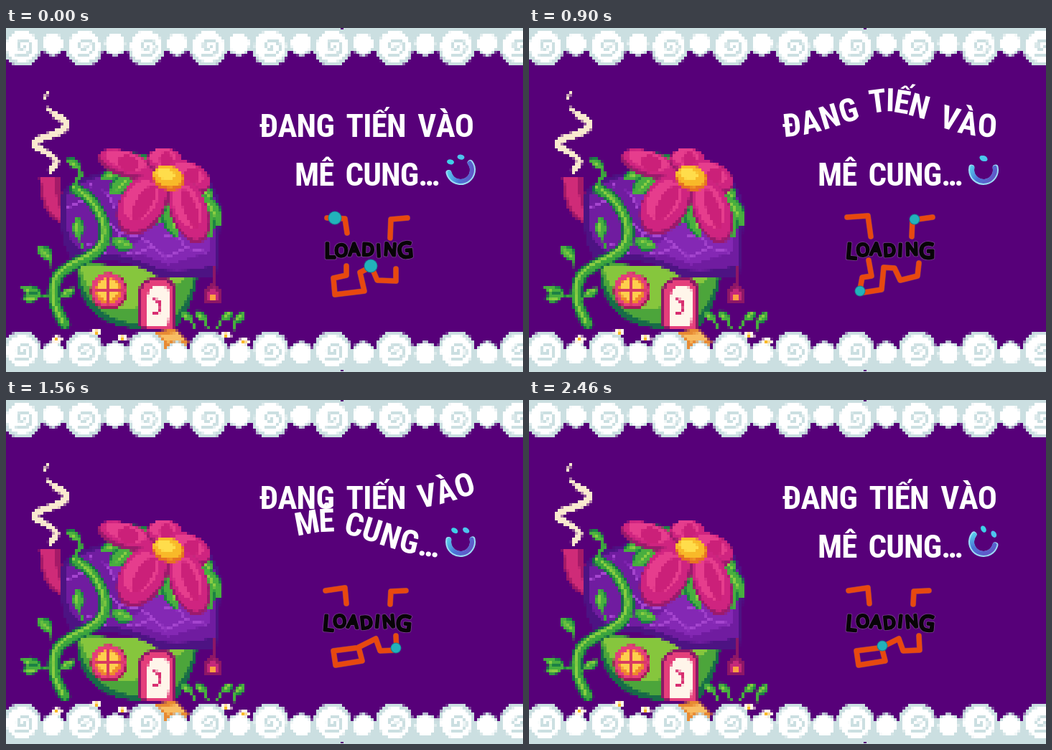
An HTML page with a canvas for the animation above (2520 ms loop, 720 by 480 pixels).

```html
<!DOCTYPE html>
<html lang="vi">
<head>
<meta charset="utf-8">
<title>Loading</title>
<style>
html, body { margin: 0; width: 100%; height: 100%; overflow: hidden; background: #570079 }
canvas { display: block }
</style>
</head>
<body>
<canvas id="stage" width="720" height="480"></canvas>
<script>
const TAU = Math.PI * 2, LOOP = 2520;
const stage = document.getElementById('stage').getContext('2d');

function layer(w, h) {
  const c = document.createElement('canvas');
  c.width = w; c.height = h;
  return c.getContext('2d');
}
function fill(g, color, d) { g.fillStyle = color; g.fill(new Path2D(d)); }
function line(g, color, width, d) {
  g.strokeStyle = color; g.lineWidth = width;
  g.lineCap = g.lineJoin = 'round';
  g.stroke(new Path2D(d));
}
function oval(g, color, x, y, rx, ry = rx, turn = 0) {
  g.fillStyle = color;
  g.beginPath(); g.ellipse(x, y, rx, ry, turn, 0, TAU); g.fill();
}

// Scenery is drawn smooth, then sampled down to chunky pixels
function leaf(g, x, y, length, width, angle) {
  g.save();
  g.translate(x, y); g.rotate(angle);
  const d = k => `M0 0Q${length * .45} ${-width * k} ${length} 0Q${length * .45} ${width * k} 0 0`;
  fill(g, '#1c8045', d(1));
  g.translate(0, -1);
  fill(g, '#48ae3f', d(.75));
  line(g, '#8acd42', 3, `M${length * .3} -1L${length * .7} -1`);
  g.restore();
}
function petal(g, x, y, rx, ry, turn) {
  oval(g, '#9c1a6c', x, y, rx, ry, turn);
  oval(g, '#cf2480', x, y - 3, rx - 2, ry - 3, turn);
  oval(g, '#e63d8d', x - 2, y - 6, rx * .7, ry * .65, turn);
  oval(g, '#cb2079', x + 2, y - 2, rx * .35, ry * .6, turn);
}
function swirl(g, x, y, dir) {
  oval(g, '#cbdfe1', x, y, 26);
  oval(g, '#fff', x, y - dir * 2, 22);
  g.beginPath();
  for (let a = 0; a < 8.6; a += .2)
    g.lineTo(x + 1 + Math.cos(a) * (2 + a * 1.6), y - dir * 2 + Math.sin(a) * (1 + a * 1.5));
  g.strokeStyle = '#cbdfe1'; g.lineWidth = 4; g.stroke();
}
function clouds(g) {
  g.fillStyle = '#cbdfe1';
  g.fillRect(0, 0, 720, 32);
  g.fillRect(0, 449, 720, 31);
  for (const [y, dir] of [[27, 1], [448, -1]]) {
    for (let x = 22; x < 760; x += 86.4) {
      oval(g, '#cbdfe1', x + 43, y - dir * 6, 17);
      oval(g, '#fff', x + 43, y - dir * 6, 14);
    }
    for (let x = 22; x < 760; x += 86.4) swirl(g, x, y, dir);
  }
}
function house(g) {
  // smoke and chimney
  line(g, '#f9e9cf', 4, 'M57 88L54 98');
  line(g, '#f9e9cf', 5, 'M57 112L68 119');
  line(g, '#f9e9cf', 10, 'M68 121Q92 132 78 142Q68 148 50 153Q32 160 46 168');
  line(g, '#f9e9cf', 8, 'M46 168Q76 182 68 190L62 198');
  fill(g, '#a51a68', 'M45 206H74L79 240L84 264L79 273Q54 264 49 236Z');
  fill(g, '#cf2b78', 'M48 208H66L70 236L76 258L74 266Q58 258 53 236Z');

  // walls
  fill(g, '#176b48', 'M98 326Q94 372 125 400Q150 419 190 419H234Q260 392 267 342Z');
  fill(g, '#4ca53b', 'M100 326Q98 364 130 392Q154 412 190 412L234 402Q256 380 263 342Z');
  fill(g, '#86c63d', 'M104 330Q104 356 132 380Q162 400 190 386L246 352V330Z');

  // roof
  fill(g, '#4d1383', 'M77 232Q88 210 124 204Q180 180 262 196Q300 218 299 262L293 346Q260 352 210 346Q176 325 132 322L98 332Q79 310 77 280Z');
  fill(g, '#701ca0', 'M82 234Q98 212 140 206Q190 190 258 202Q295 222 294 262L290 330Q250 342 212 336Q170 314 112 312Q88 305 84 276Z');
  fill(g, '#8428b4', 'M132 225L190 290L170 308L226 330L282 312L290 250L200 240Z');
  line(g, '#a545cf', 3, 'M84 250L108 240L118 216M142 270L158 285L152 304L176 316L205 304L222 320L250 306L278 312M158 285L188 292L205 304M112 300L140 315M222 290L240 292L250 306M142 232L150 250');

  // flower
  leaf(g, 212, 200, 50, 22, -2.6);
  leaf(g, 178, 200, 48, 26, 2.4);
  leaf(g, 160, 196, 32, 18, 2.7);
  leaf(g, 262, 212, 40, 24, .9);
  leaf(g, 272, 232, 52, 28, 1.05);
  leaf(g, 276, 250, 44, 22, 1.4);
  leaf(g, 226, 238, 46, 30, 2.2);
  leaf(g, 224, 246, 48, 26, 1.3);
  petal(g, 168, 190, 42, 18, .3);
  petal(g, 220, 185, 25, 18, 0);
  petal(g, 256, 208, 31, 20, .5);
  petal(g, 254, 254, 26, 48, -.35);
  petal(g, 189, 246, 31, 46, .55);
  oval(g, '#e77222', 226, 209, 23, 17, .3);
  oval(g, '#f8b929', 225, 206, 21, 15, .3);
  oval(g, '#ffdd4b', 222, 203, 13, 8, .3);

  // vine
  const vine = 'M81 412Q56 374 72 346Q84 332 112 320Q150 300 132 262Q120 236 96 224';
  line(g, '#176b48', 17, vine);
  line(g, '#3ca63d', 12, vine);
  g.translate(-2, -2);
  line(g, '#8acd42', 4, vine);
  g.translate(2, 2);
  line(g, '#3ca63d', 5, 'M98 224Q92 214 104 205L101 190');
  leaf(g, 104, 194, 24, 14, -2.6);
  leaf(g, 101, 294, 32, 18, -1.6);
  line(g, '#3ca63d', 3, 'M101 292L106 305M138 302L158 296M64 345L62 318M62 376L40 370M70 380L92 366');
  leaf(g, 145, 296, 34, 20, .3);
  leaf(g, 64, 322, 28, 18, -2.4);
  leaf(g, 50, 374, 32, 18, -2.7);
  leaf(g, 48, 372, 28, 14, 2.9);
  leaf(g, 76, 376, 24, 14, -.6);

  // window
  oval(g, '#a51a58', 143, 367, 26);
  oval(g, '#e43f7b', 142, 365, 24);
  oval(g, '#ef8a2d', 142, 366, 18);
  oval(g, '#ffcf4d', 141, 364, 15);
  line(g, '#d83a62', 4, 'M142 349V384M124 366H160');

  // door
  fill(g, '#8d1766', 'M184 416V368Q186 349 206 348H222Q237 352 237 374L234 420H194Z');
  fill(g, '#e43f7b', 'M188 414V368Q190 352 208 352H220Q233 356 233 374L230 418H196Z');
  fill(g, '#fff5ea', 'M197 414V374Q198 360 210 360H218Q228 362 228 376L225 415Z');
  line(g, '#d82e70', 4, 'M206 379Q216 380 215 390Q214 397 206 398');

  // lantern
  line(g, '#8d1766', 3, 'M289 332V356');
  fill(g, '#8d1766', 'M288 354L300 366V384H276V366Z');
  fill(g, '#c4287a', 'M288 360L296 369V380H280V369Z');
  fill(g, '#ff9f43', 'M284 380V374L288 369L292 374V380Z');

  // ground
  for (const [x, y, tilt] of [[262, 418, -.3], [280, 418, -.2], [294, 418, .4], [316, 420, .2]]) {
    line(g, '#48ae3f', 4, `M${x} ${y}l${tilt * 20} -16`);
    leaf(g, x + tilt * 20, y - 10, 18, 13, tilt < 0 ? -2.2 : -.8);
  }
  fill(g, '#e78a33', 'M190 424L236 420L254 438L246 446H215Z');
  fill(g, '#f8bd63', 'M212 427L238 425L247 434L224 438Z');
}
function daisies(g) {
  for (const [x, y] of [[70, 434], [125, 424], [162, 432], [306, 428], [331, 437]]) {
    oval(g, '#fff7ec', x, y, 8, 5);
    oval(g, '#f8b929', x, y, 2.5);
  }
}
function makeScene() {
  const smooth = layer(720, 480), small = layer(180, 120), scene = layer(720, 480);
  house(smooth);
  clouds(smooth);
  daisies(smooth);
  small.imageSmoothingEnabled = scene.imageSmoothingEnabled = false;
  small.drawImage(smooth.canvas, 0, 0, 180, 120);
  scene.fillStyle = '#570079';
  scene.fillRect(0, 0, 720, 480);
  scene.drawImage(small.canvas, 0, 0, 720, 480);
  scene.fillRect(466, 0, 4, 2);
  scene.fillRect(466, 477, 4, 2);
  return scene.canvas;
}

// Heading: a bump travels through the letters in reading order
const FONT = 'bold 45px "Roboto Condensed", "Open Sans Condensed", "Noto Sans", sans-serif';
function setFont() {
  stage.font = FONT;
  stage.fontStretch = 'extra-condensed';
}
function layoutText() {
  setFont();
  const letters = [];
  let index = 0;
  for (const [text, left, right, y] of [['ĐANG TIẾN VÀO', 353, 652, 152], ['MÊ CUNG…', 402, 604, 219.5]]) {
    const widths = [...text].map(ch => ch === ' ' ? 17 : stage.measureText(ch).width);
    const gap = (right - left - widths.reduce((a, b) => a + b)) / (widths.length - 1);
    let x = left;
    [...text].forEach((ch, i) => {
      letters.push({ ch, x: x + widths[i] / 2, y, index: index++ });
      x += widths[i] + gap;
    });
    index++;
  }
  return letters;
}
function drawHeading(t) {
  setFont();
  stage.fillStyle = '#fff';
  stage.textAlign = 'center';
  for (const { ch, x, y, index } of letters) {
    const d = index - (t / 70 - 7), phase = Math.PI * d / 6.5;
    const inside = Math.abs(d) < 6.5;
    const lift = inside ? 18 * (1 + Math.cos(phase)) : 0;
    const slope = inside ? .32 * Math.sin(phase) : 0;
    stage.save();
    stage.translate(x, y - 16 - lift);
    stage.rotate(Math.atan(slope));
    stage.fillText(ch, 0, 16);
    stage.restore();
  }
}

// Swaying smile
const SWAY = [[0, -25], [600, 0], [900, 0], [1320, -18], [1860, 20], [2220, 32], [2520, 25]];
function drawSmile(t) {
  const i = SWAY.findIndex(k => k[0] > t);
  const [t0, a0] = SWAY[i - 1], [t1, a1] = SWAY[i];
  const angle = a0 + (a1 - a0) * (t - t0) / (t1 - t0);
  stage.save();
  stage.translate(633, 198);
  const tint = stage.createLinearGradient(-18, -8, 14, 16);
  tint.addColorStop(0, '#59d8ee');
  tint.addColorStop(.5, '#4a74d8');
  tint.addColorStop(1, '#6552c4');
  stage.rotate(angle * Math.PI / 180);
  stage.lineCap = 'round';
  for (const [color, width, r] of [['#9adcf5', 8, 17], [tint, 6, 16]]) {
    stage.strokeStyle = color; stage.lineWidth = width;
    stage.beginPath(); stage.arc(0, 0, r, -.2, Math.PI + .2); stage.stroke();
  }
  const apart = t > 780 && t < 1020 ? 1 : 8;
  oval(stage, '#3fd0e8', -apart, -16, 5, 3.5, .6);
  oval(stage, '#4ec4ee', apart, -16, 5, 3.5, .6);
  stage.restore();
}

// Hand-drawn maze: two balls follow one route, half a route apart
const ROUTE = [[458, 265], [473, 279], null, [474, 332], [467, 346], [461, 367], [484, 366], [492, 343],
  [508, 332], [518, 350], [543, 346], null, [532, 286], [537, 267], [561, 262], null];
const MAZE = [
  'M447 265L472 266L475 286M535 293L536 267L559 265M474 332V345L456 349L458 372L499 367L493 341L509 333L517 352L543 353V336',
  'M443 264L472 262L476 291M533 291L534 268L562 264M473 324L477 346L464 348L460 370L491 365L494 334L509 335L517 352L541 346L543 328',
  'M445 266L472 262L474 284M535 285L536 267L557 266M487 346L456 350L459 370L496 364L491 345L515 333L521 350L544 349L543 329'
];
const WOBBLE = [0, 1, 2, 0, 1, 1, 1, 2];
function drawMaze(t) {
  const step = Math.floor((t + 30) / 157.5) % 8, pose = WOBBLE[step];
  line(stage, '#8a3a5c', 8, MAZE[pose]);
  line(stage, '#e8480f', 7, MAZE[pose]);
  for (const spot of [ROUTE[step], ROUTE[step + 8]])
    if (spot) {
      oval(stage, '#1a7f94', ...spot, step ? 7.5 : 9.5);
      oval(stage, '#22b2bb', ...spot, step ? 6.5 : 8.5);
    }
  stage.fontStretch = 'normal';
  stage.textAlign = 'center';
  stage.fillStyle = '#080408';
  [...'LOADING'].forEach((ch, i) => {
    const tall = /[LG]/.test(ch);
    stage.font = `${tall ? 30 : 24}px "Open Sans", sans-serif`;
    stage.save();
    stage.translate([451, 467, 485, 504, 519, 535, 556][i] - [0, 2, 2][pose], 311 + Math.sin(i * 2 + pose));
    stage.rotate(Math.sin(i * 3 + pose) * .1);
    for (const [color, width] of [['#75408a', 5], ['#080408', 3.4]]) {
      stage.strokeStyle = color; stage.lineWidth = width;
      stage.strokeText(ch, 0, tall ? 10 : 7);
    }
    stage.fillText(ch, 0, tall ? 10 : 7);
    stage.restore();
  });
}

const scene = makeScene(), letters = layoutText();
function draw() {
  const t = Math.floor(performance.now() % LOOP / 60) * 60;
  stage.drawImage(scene, 0, 0);
  drawMaze(t);
  drawHeading(t);
  drawSmile(t);
  requestAnimationFrame(draw);
}
draw();
</script>
</body>
</html>
```
